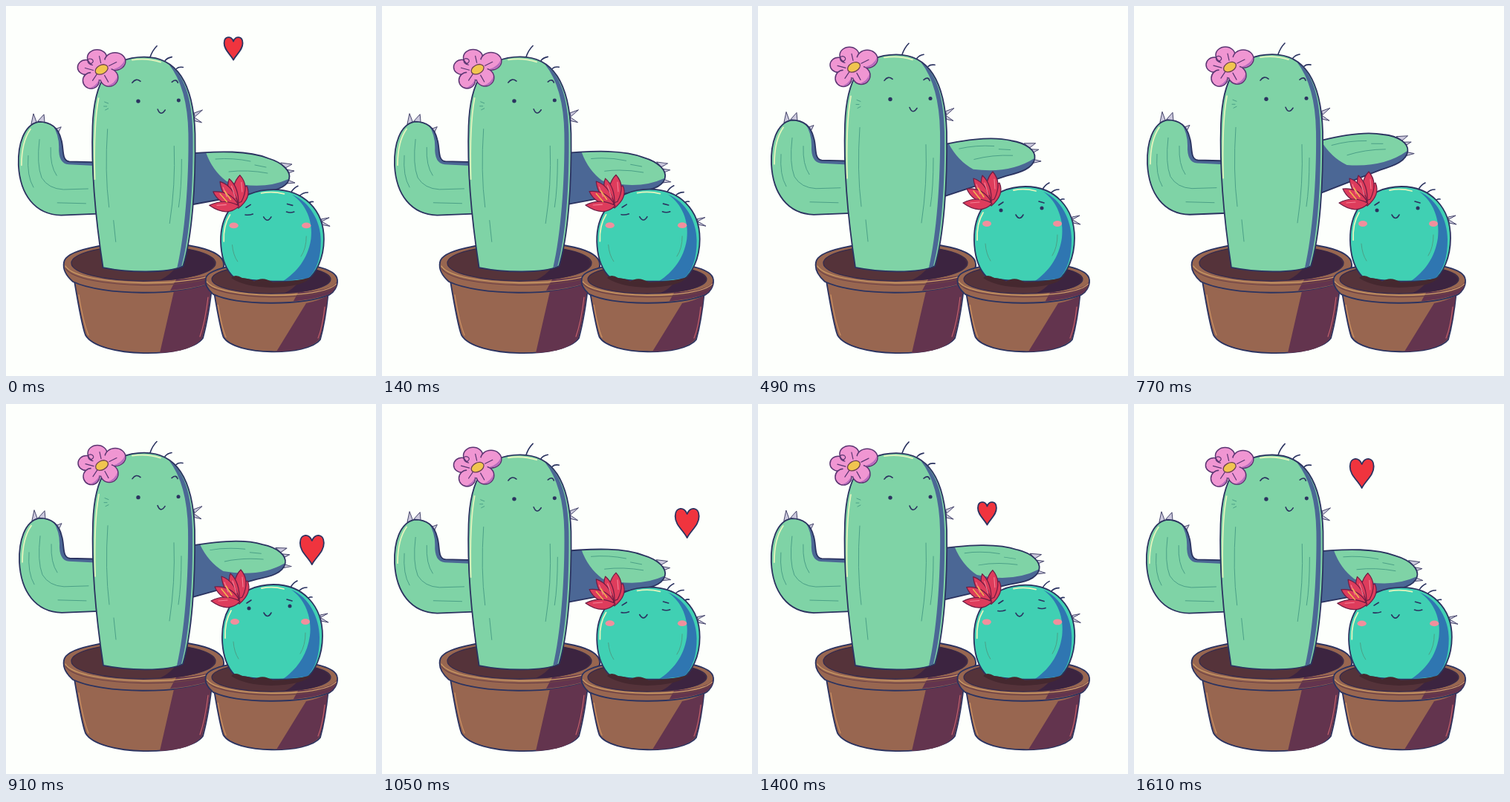
These frames come from a looping animation (498x498 px, 1.68 s). An HTML page:

```html
<!DOCTYPE html>
<html lang="en">
<head>
<meta charset="utf-8">
<title>Cactus pat</title>
<style>
html, body { margin: 0; width: 100%; height: 100%; overflow: hidden; background: #fdfffc; }
svg { display: block; width: 100vw; height: 100vh; }
path, ellipse, circle { stroke-linecap: round; stroke-linejoin: round; vector-effect: non-scaling-stroke; }
.o { stroke: #2b3360; stroke-width: 1.8; }
.l { fill: none; stroke: #2b3360; stroke-width: 1.6; }
.v { fill: none; stroke: #4ba087; stroke-width: 1; }
.h { fill: none; stroke: #e4f5bd; stroke-width: 1.8; }
.n { fill: none; }
.g { fill: #7fd3a6; }
.d { fill: #4b6795; }
.s { fill: #cbc8dc; stroke: #45456b; stroke-width: 1; }
.p { fill: #f096d2; stroke: #5b3572; stroke-width: 1.5; }
.r { fill: #de3c5c; stroke: #6d1d44; stroke-width: 1.2; }
.e { fill: #2b3360; }
.shade { fill: #63344e; }
.glow { fill: none; stroke: #c4606c; stroke-width: 1.2; }
</style>
</head>
<body>
<svg viewBox="0 0 498 498">
  <defs>
    <g id="pot">
      <path class="o" fill="#986650" d="M92 370C97 400 102 430 107 443C125 474 245 475 265 447C271 425 275 400 278 370Z"/>
      <path class="n" stroke="#c98f62" stroke-width="1.3" d="M98 389Q104 426 111 443"/>
      <path class="o" fill="#986650" d="M78 345C82 312 290 306 293 347C294 358 287 368 280 372C235 391 130 390 90 371C82 364 76 355 78 345Z"/>
      <path class="shade" d="M229 368L221 383C250 380 270 375 280 371C287 367 293 358 292 350C288 362 255 367 229 368Z"/>
      <path class="n" stroke="#6b4045" stroke-width="1.2" d="M80 353C98 382 270 383 291 357"/>
      <path class="n" stroke="#d0a067" stroke-width="1.2" d="M80 350C98 379 270 380 291 354"/>
      <ellipse cx="185" cy="346" rx="97" ry="24" fill="#55333a" stroke="#352b4c" stroke-width="1.3"/>
      <path fill="#3c2440" d="M237 326C265 330 281 338 281 347C277 361 240 369 207 369Q236 355 237 326Z"/>
    </g>
    <path id="heart" class="o" fill="#f0343e" d="M0-12C-3-22-16-22-16-9C-16 3-6 9 0 20C6 9 16 3 16-9C16-22 3-22 0-12Z"/>
  </defs>

  <g id="arm">
    <path class="s" d="M370 211L385 213L376 218ZM377 220L388 222L380 225ZM379 234L389 238L377 239Z"/>
    <path class="g" d="M230 200C290 194 328 195 353 205C373 211 384 223 381 233C377 246 360 249 340 251L230 271Z"/>
    <path class="d" d="M230 200L269 197Q278 222 297 236Q345 249 380 233C377 246 360 249 340 251L230 271Z"/>
    <path class="o n" d="M230 200C290 194 328 195 353 205C373 211 384 223 381 233C377 246 360 249 340 251L230 271Z"/>
    <path class="v" d="M282 206Q305 204 329 209M300 223Q325 220 352 225M335 214L350 217"/>
  </g>

  <use href="#pot"/>
  <path class="shade" d="M226 384Q256 381 277 373C274 400 270 425 264 447C256 459 235 466 207 467Z"/>
  <path class="glow" d="M272 392Q268 425 261 445"/>

  <g id="tall">
    <path class="s" d="M35 157L38 143L42 154ZM44 153L52 144L53 155ZM67 164L75 161L71 169Z"/>
    <path class="g" d="M125 209L86 208C75 207 79 190 75 178C71 161 60 154 45 154C25 158 17 185 18 213C20 253 40 280 75 281L125 279Z"/>
    <path class="d" d="M125 209L86 208C75 207 79 190 75 178C73 169 69 163 64 159Q72 172 72 188Q71 211 85 212L125 214Z"/>
    <path class="o n" d="M125 209L86 208C75 207 79 190 75 178C71 161 60 154 45 154C25 158 17 185 18 213C20 253 40 280 75 281L125 279"/>
    <path class="h" d="M22 213Q22 181 34 164"/>
    <path class="v" d="M46 178Q42 212 49 230Q58 245 78 246L111 245M31 200Q29 228 38 243M61 189Q60 214 69 227M70 264L108 265"/>

    <path class="s" d="M253 142L264 138L254 147ZM253 148L263 155L254 153Z"/>
    <path class="l" d="M194 66Q197 57 203 51M214 71Q217 67 223 66M229 82Q232 79 238 80"/>
    <path class="g" d="M131 352C120 280 115 220 117 160C119 100 137 66 186 66C233 66 252 108 254 170C255 240 250 310 238 350C215 361 160 358 131 352Z"/>
    <path class="d" d="M219 76C239 90 250 120 251 170C252 240 247 310 236 350L230 352C240 310 246 235 245 170Q244 108 219 76Z"/>
    <path class="o n" d="M131 352C120 280 115 220 117 160C119 100 137 66 186 66C233 66 252 108 254 170C255 240 250 310 238 350C215 361 160 358 131 352Z"/>
    <path class="h" d="M120 232Q118 160 125 122M170 70Q190 67 208 73"/>
    <path class="v" d="M137 164Q133 222 139 270M145 288L148 317M226 187Q228 240 220 292M236 205Q236 245 232 270M133 127L138 129M132 133L136 133M134 138L138 136"/>
    <circle class="e" cx="178" cy="126" r="2.7"/>
    <circle class="e" cx="232" cy="125" r="2.5"/>
    <path class="l" d="M170 101Q175 94 181 99M223 100Q229 95 231 101M204 137Q208 147 214 138"/>

    <g class="p">
      <ellipse cx="108" cy="80" rx="11" ry="10"/>
      <ellipse cx="123" cy="67" rx="13" ry="11"/>
      <ellipse cx="147" cy="72" rx="14" ry="12"/>
      <ellipse cx="139" cy="94" rx="12" ry="12"/>
      <ellipse cx="115" cy="98" rx="11" ry="11"/>
    </g>
    <path fill="#b76bbd" d="M160 70Q160 84 144 83Q156 80 160 70ZM150 92Q150 106 137 105Q147 102 150 92ZM125 98Q124 109 113 108Q121 106 125 98Z"/>
    <circle cx="128" cy="83" r="14" fill="#f096d2"/>
    <path class="n" stroke="#5b3572" stroke-width="1.2" d="M117 77C108 75 109 66 116 69Q120 72 115 75M139 78L149 73M133 91L138 100M123 89L117 98M118 84L107 81M128 74L126 65"/>
    <ellipse cx="129" cy="83" rx="9" ry="6" transform="rotate(-28 129 83)" fill="#f1c54f" stroke="#6c4050" stroke-width="1.3"/>
  </g>

  <use href="#pot" transform="translate(268 346) scale(.824 .805) translate(-77 -319)"/>
  <path class="shade" d="M404 400Q420 397 433 390C431 411 427 432 422 448C414 459 390 465 364 465Z"/>
  <path class="glow" d="M429 405Q426 432 420 447"/>

  <g id="small">
    <path class="s" d="M423 284L433 282L424 287ZM424 288L434 294L424 292Z"/>
    <path class="l" d="M383 247Q386 241 392 238M394 252Q398 247 405 247M405 263Q408 259 412 260"/>
    <path fill="#40d0b3" d="M308 365C288 345 286 300 300 275C315 250 340 243 360 243C400 243 426 272 426 312C426 340 415 360 405 368C380 372 340 372 308 365Z"/>
    <path fill="#2f76b1" d="M384 250C403 263 412 288 409 312C405 340 390 358 373 370L405 367C417 355 422 338 422 314C422 288 408 260 384 250Z"/>
    <path class="o n" d="M308 365C288 345 286 300 300 275C315 250 340 243 360 243C400 243 426 272 426 312C426 340 415 360 405 368C380 372 340 372 308 365Z"/>
    <path class="h" d="M295 315Q294 293 303 278M344 248Q359 245 374 249"/>
    <path class="v" d="M403 308Q403 325 396 336M306 320Q307 334 313 343"/>
    <ellipse cx="308" cy="293" rx="6" ry="4" fill="#f18f9d"/>
    <ellipse cx="403" cy="293" rx="6" ry="4" fill="#f18f9d"/>
    <path class="l" d="M347 281Q352 290 357 281M324 268L330 264M378 263L385 265"/>
    <g id="open">
      <circle class="e" cx="327" cy="275" r="2.5"/>
      <circle class="e" cx="382" cy="272" r="2.5"/>
    </g>
    <path id="shut" class="l" d="M323 278Q328 279 333 277M377 274Q382 276 387 274"/>

    <g class="r">
      <path d="M311 266Q312 242 325 238Q332 254 314 269Z"/>
      <path d="M307 264Q304 235 316 223Q329 238 318 260Z"/>
      <path d="M307 266Q297 242 302 228Q315 240 314 264Z"/>
      <path d="M308 265Q292 252 290 232Q308 238 314 264Z"/>
      <path d="M311 267Q288 263 281 246Q302 244 313 262Z"/>
      <path d="M315 266Q299 282 276 265Q295 255 314 265Z"/>
    </g>
    <path class="n" stroke="#f58296" stroke-width="1.1" d="M310 254L305 238M319 246L318 233M299 253L294 240M298 264L286 265"/>
    <path class="n" stroke="#f0bd50" stroke-width="1.4" d="M299 260L290 249M304 257L296 245"/>
  </g>
  <path fill="#45282f" d="M303 366Q308 360 318 366Q330 367 334 371Q345 363 359 372Q390 371 411 365Q400 378 357 379Q320 378 303 366Z"/>

  <use id="heartA" href="#heart"/>
  <use id="heartB" href="#heart"/>
</svg>
<script>
const LOOP = 1680, STEP = 70;
const $ = id => document.getElementById(id);
const smooth = u => (1 - Math.cos(Math.PI * u)) / 2;

// Interpolates [time, value] keys, holding the end values.
function track(keys, t, ease = u => u) {
  if (t <= keys[0][0]) return keys[0][1];
  for (let i = 1; i < keys.length; i++) {
    const [t0, a] = keys[i - 1], [t1, b] = keys[i];
    if (t <= t1) return a + (b - a) * ease((t - t0) / (t1 - t0));
  }
  return keys[keys.length - 1][1];
}

const armAngle = [[70, 0], [730, -11.3], [1070, -.3], [1365, -3], [1645, 0]];
const heartRise = [[0, 158], [70, 147], [280, 93], [350, 57], [420, 46]];
const heartSize = [[0, 0], [70, .78], [140, 1], [280, 1], [350, .78], [420, .4], [455, 0]];

function squash(id, x, y, sx, sy) {
  $(id).setAttribute("transform", `translate(${x} ${y}) scale(${sx} ${sy}) translate(${-x} ${-y})`);
}

function heart(id, t, start, dx, dy) {
  const p = (t - start + LOOP) % LOOP;
  const x = 309 - p / 120 + dx, y = track(heartRise, p) + dy;
  $(id).setAttribute("transform", `translate(${x} ${y}) scale(${track(heartSize, p)})`);
}

function draw(now) {
  const t = Math.floor(now % LOOP / STEP) * STEP;
  const angle = track(armAngle, t, smooth);
  const press = Math.max(0, 1 + angle / 3.4);
  $("arm").setAttribute("transform", `rotate(${angle} 177 280)`);
  squash("tall", 186, 357, 1 + .007 * press, 1 - .009 * press - .0003 * angle);
  squash("small", 359, 370, 1 + .028 * press, 1 - .032 * press);
  const shut = angle > -5;
  $("shut").style.display = shut ? "" : "none";
  $("open").style.display = shut ? "none" : "";
  heart("heartA", t, 1330, 0, 0);
  heart("heartB", t, 770, 104, 67);
}

const begin = performance.now();
function tick() {
  draw(performance.now() - begin);
  requestAnimationFrame(tick);
}
tick();
</script>
</body>
</html>
```
